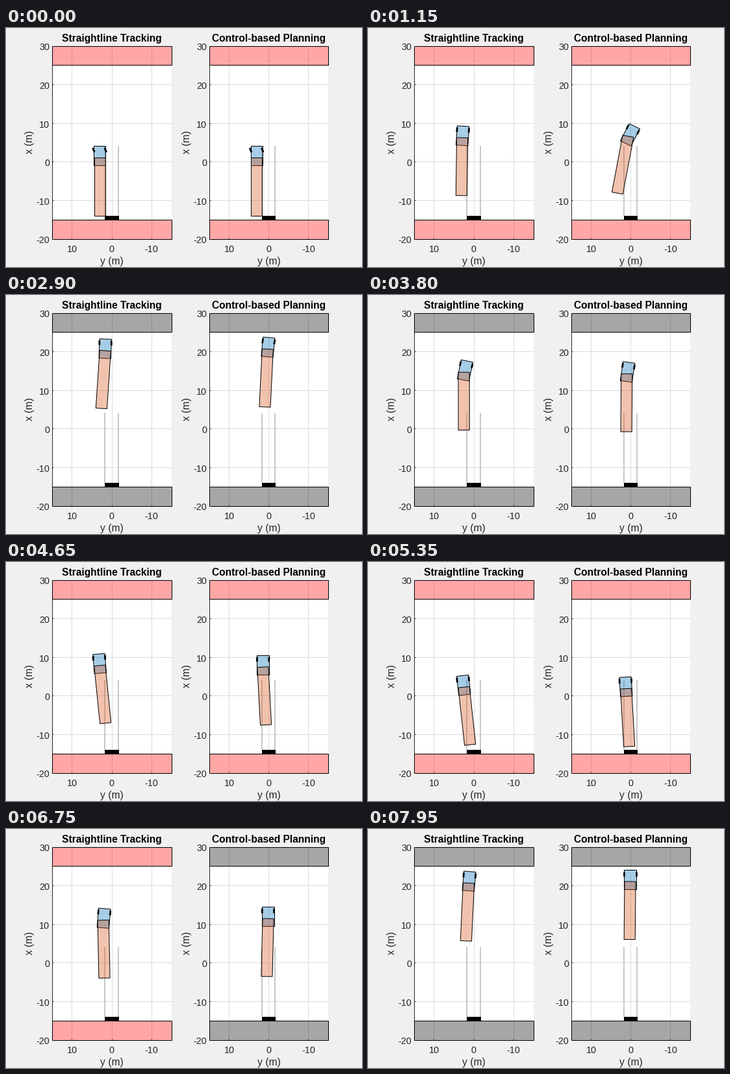
A matplotlib script that plays this animation: 548 px wide and 369 px high, repeating every 8000 ms.

```python
import numpy as np
import matplotlib.pyplot as plt
from matplotlib.animation import FuncAnimation
from matplotlib.patches import Polygon

W, H, DPI = 548, 369, 100
PT = 72 / DPI
FRAMES, INTERVAL = 160, 50
TOP, BOTTOM = 28, 326
REST, LEG = 10, 50               # frames at rest, frames per drive
SPEED, REACH = .4, 20            # metres per frame, length of a drive
HITCH, BASE = 10, 3              # hitch to trailer axle, truck wheelbase
DARK, GRID = "#262626", "#dbdbdb"
RED, GRAY = (1, 0, 0, .35), (0, 0, 0, .35)
BLUE, ORANGE = (0, .447, .741, .35), (.851, .325, .098, .35)

plt.rcParams["font.family"] = "Liberation Sans"
fig = plt.figure(figsize=(W / DPI, H / DPI), dpi=DPI, facecolor="#f0f0f0")
ax = fig.add_axes([0, 0, 1, 1])
ax.set_xlim(.5, W + .5)
ax.set_ylim(H + .5, .5)
ax.axis("off")


def smooth(t, keys, vals):
    """Cubic curve through the keys without overshoot."""
    d = np.diff(vals) / np.diff(keys)
    a, b = d[:-1], d[1:]
    same = a * b > 0
    inner = np.where(same, 2 * a * b / np.where(same, a + b, 1), 0)
    m = np.concatenate([d[:1], inner, d[-1:]])
    i = np.clip(np.searchsorted(keys, t, side="right") - 1, 0, len(keys) - 2)
    h = keys[i + 1] - keys[i]
    u = (t - keys[i]) / h
    return ((1 + 2 * u) * (1 - u) ** 2 * vals[i] + u * (1 - u) ** 2 * h * m[i]
            + u * u * (3 - 2 * u) * vals[i + 1] + u * u * (u - 1) * h * m[i + 1])


def roll(pose, x, truck):
    """Hitch y and trailer angle while the truck rolls along x."""
    y, trailer = pose
    out = [(y, trailer)]
    for dx, a in zip(np.diff(x), (truck[:-1] + truck[1:]) / 2):
        y += dx * np.tan(a)
        trailer += dx * np.sin(a - trailer) / (HITCH * np.cos(a))
        out.append((y, trailer))
    return np.array(out)


def trajectory(start, headings, dock):
    """Rows of x, y, trailer, truck and wheel angle: out, back and out again."""
    keys, angles = np.array(headings, float).T
    angles = np.radians(angles)
    dock = (dock[0], np.radians(dock[1]))
    bounds = [start, start + LEG, start + 2 * LEG, FRAMES - 1]
    legs = []
    for a, b in zip(bounds, bounds[1:]):
        t = np.arange(a, b + 1)
        use = (keys >= a) & (keys <= b)
        x = REACH - abs(REACH - SPEED * (t - start) % (2 * REACH))
        truck = smooth(t, keys[use], angles[use])
        wheel = np.arctan(BASE * np.gradient(truck, x))
        legs.append((x, truck, np.clip(wheel, -.5, .5)))

    (x1, th1, _), (x2, th2, _), (x3, th3, _) = legs
    out = roll((3, 0), x1, th1)
    # roll the reverse drive from the dock, then ease away the drift
    back = roll(dock, x2[::-1], th2[::-1])[::-1]
    back = back + np.linspace(1, 0, len(back))[:, None] * (out[-1] - back[0])
    poses = [out, back, roll(dock, x3, th3)]

    rows = [np.column_stack([x, p, th, wheel])
            for (x, th, wheel), p in zip(legs, poses)]
    rest = np.tile([0, 3, 0, 0, np.radians(22)], (start, 1))
    path = np.vstack([rest, rows[0][:-1], rows[1][:-1], rows[2]])
    path[:REST] = rest[0]
    return path


def text(x, y, s, size, ha="center", **kw):
    ax.text(x, y, s, fontsize=size * PT, ha=ha, va="baseline", **kw)


def line(xs, ys, color, z, width=1):
    return ax.plot(xs, ys, color=color, lw=width * PT, zorder=z,
                   solid_capstyle="butt")[0]


class Panel:
    def __init__(self, left, right, title, path, switches):
        self.left, self.right = left, right
        self.mid, self.scale = (left + right) / 2, (right - left) / 30
        self.path, self.switches = path, switches
        self.frame(title)
        self.bars = [self.shape(self.box(lo, hi, 15), RED, 3)
                     for lo, hi in ((25, 30), (-20, -15))]
        for side in (-1.65, 1.65):
            px, py = self.px(np.array([-14, 4]), np.array([side, side]))
            line(px, py, "#c8c8c8", 4, 2)
        self.shape(self.box(-15, -14, 1.65), "black", 5)
        self.truck = self.shape(self.box(-1, 4, 1.5), BLUE, 6)
        self.trailer = self.shape(self.box(-14, 1, 1.4), ORANGE, 7)
        self.wheels = [line([], [], "black", 8, 2.8) for _ in range(2)]

    def px(self, x, y):
        return self.mid - self.scale * y, BOTTOM - (x + 20) * (BOTTOM - TOP) / 50

    def box(self, rear, front, half, x=0, y=0, angle=0):
        u = np.array([rear, front, front, rear])
        v = np.array([-half, -half, half, half])
        return np.column_stack(self.body(x, y, angle, u, v))

    def body(self, x, y, angle, u, v):
        c, s = np.cos(angle), np.sin(angle)
        return self.px(x + u * c - v * s, y + u * s + v * c)

    def shape(self, pts, color, z):
        return ax.add_patch(Polygon(pts, closed=True, fc=color, ec="black",
                                    lw=PT, zorder=z, joinstyle="miter"))

    def frame(self, title):
        l, r = self.left, self.right
        ax.add_patch(Polygon([(l, TOP), (r, TOP), (r, BOTTOM), (l, BOTTOM)],
                             fc="white", ec="none", zorder=0))
        for y in (10, 0, -10):
            px = self.px(0, y)[0]
            line([px, px], [TOP, BOTTOM], GRID, 1)
            line([px, px], [BOTTOM - 2, BOTTOM], DARK, 9)
            text(px + .4, 346, str(y), 14.4, color=DARK)
        for x in range(-20, 31, 10):
            py = self.px(x, 0)[1]
            line([l, r], [py, py], GRID, 1)
            line([l, l + 2], [py, py], DARK, 9)
            text(l - 3.5, py + 7, str(x), 14.4, ha="right", color=DARK)
        line([l, l, r], [TOP, BOTTOM, BOTTOM], DARK, 2)
        text(self.mid + .5, 365, "y (m)", 15.6, color=DARK)
        text(l - 30, 176.5, "x (m)", 15.6, color=DARK, rotation=90,
             rotation_mode="anchor")
        text(self.mid + .3, 22, title, 15.55, weight="bold", color="black")

    def update(self, n):
        x, y, trailer, truck, wheel = self.path[n]
        self.truck.set_xy(self.box(-1, 4, 1.5, x, y, truck))
        self.trailer.set_xy(self.box(-14, 1, 1.4, x, y, trailer))
        u = np.array([-.6, .6])
        for item, side in zip(self.wheels, (-1.5, 1.5)):
            item.set_data(*self.body(x, y, truck, BASE + u * np.cos(wheel),
                                     side + u * np.sin(wheel)))
        passed = sum(n >= s for s in self.switches)
        for bar in self.bars:
            bar.set_facecolor(GRAY if passed % 2 else RED)


# key points: frame and truck heading in degrees; dock: hitch y, trailer angle
tracking = trajectory(
    10, [(10, 0), (39, -6.3), (60, -1.5), (76, -11.5), (93, 4.5), (110, 6.5),
         (120, -.7), (135, -4.5), (159, -5)], dock=(2.2, 6))
planning = trajectory(
    9, [(9, 0), (16, -27), (23, -27), (42, 17), (47, 2), (59, -6), (76, -8.5),
        (93, 0), (109, 4), (115, -17), (126, 1.5), (135, 0), (159, 0)],
    dock=(1, 3))

panels = [Panel(71, 255, "Straightline Tracking", tracking, (33, 86, 140)),
          Panel(313, 496, "Control-based Planning", planning, (33, 86, 124))]


def draw(n=0):
    for panel in panels:
        panel.update(n)
    return []


anim = FuncAnimation(fig, draw, frames=FRAMES, interval=INTERVAL, init_func=draw,
                     repeat=True, repeat_delay=0, blit=False)
plt.show()
```
